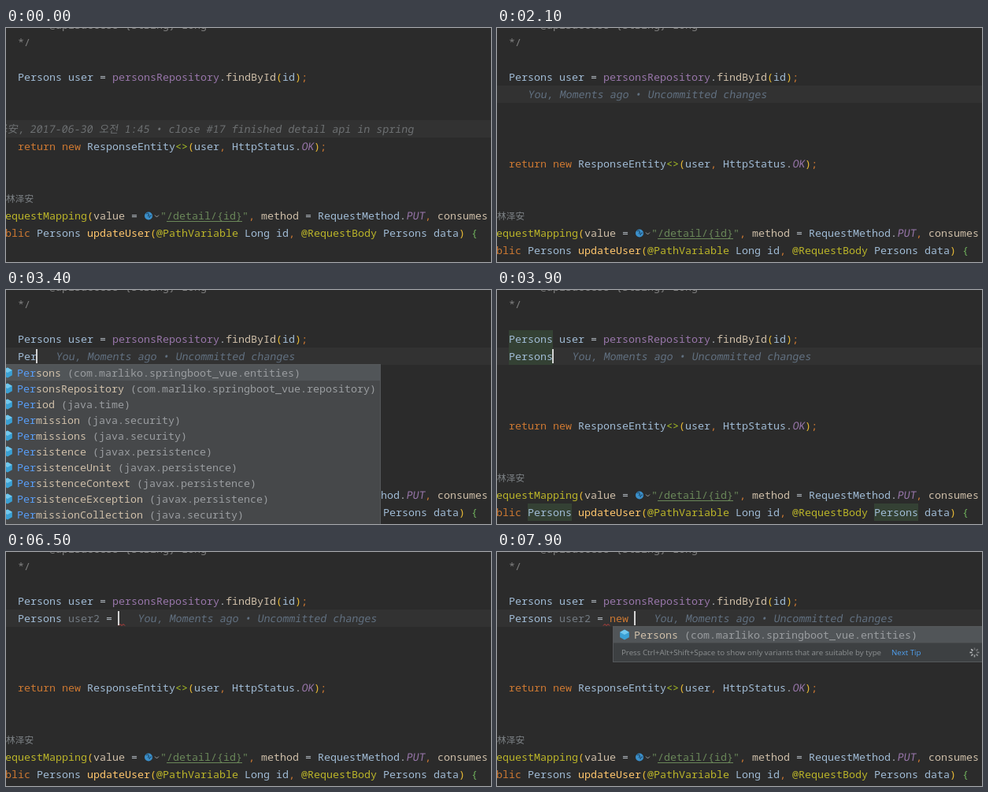
An HTML page for the animation above (8000 ms loop, 616 by 297 pixels).

```html
<!DOCTYPE html>
<html lang="en">
<head>
<meta charset="utf-8">
<title>Typing in a code editor</title>
<style>
  html, body { margin: 0; width: 100%; height: 100%; overflow: hidden; background: #2b2b2b; }
  svg { display: block; }
  text {
    white-space: pre;
    font: 13.333px "Noto Sans Mono", "Noto Sans CJK SC", "Noto Sans CJK KR", "Noto Sans CJK", monospace;
  }
  text.tip { font: 9.75px "Open Sans", "Noto Sans", sans-serif; }
  text.author { font-size: 11.7px; }
</style>
</head>
<body>
<svg id="stage" width="616" height="297" viewBox="0 0 616 297"></svg>
<script>
const LOOP = 8000, CELL = 8, LEFT = 15;
const AUTHOR = '林泽安', PKG = 'com.marliko.springboot_vue';
const ink = {
  t: '#a0bbd5', // types and variables
  p: '#b5bcc4', // punctuation
  k: '#cc7832', // keywords
  f: '#9876aa', // fields
  c: '#cfbfa9', // calls and attributes
  d: '#ffc66d', // declarations
  a: '#bbb529', // annotations
  s: '#6a8759', // strings
  b: '#e8ba36', // round brackets
  n: '#a8c023', // angle brackets
  q: '#6fae5c', // braces
  m: '#808080', // comments
  u: '#727a82', // unused
  g: '#9a9da0', // popup details
  h: '#589df6', // matched letters
  w: '#c8cacc'
};

const stage = document.getElementById('stage');

function add(parent, tag, attrs, text) {
  const el = document.createElementNS('http://www.w3.org/2000/svg', tag);
  for (const key in attrs) el.setAttribute(key, attrs[key]);
  if (text) el.textContent = text;
  parent.appendChild(el);
  return el;
}
const rect = (g, x, y, width, height, fill) => add(g, 'rect', { x, y, width, height, fill });
const path = (g, d, stroke, width = 1, fill = 'none') =>
  add(g, 'path', { d, stroke, 'stroke-width': width, fill });

function slanted(g, x, y, text, fill) {
  add(g, 'text', { transform: `translate(${x} ${y}) skewX(-9)`, fill }, text);
}

// runs: colour key, text, colour key, text ...; returns the end x
function line(g, x, y, runs) {
  for (let i = 0; i < runs.length; i += 2) {
    const [key, text] = [runs[i], runs[i + 1]];
    if (key === 'i') slanted(g, x, y, text, ink.f);
    else add(g, 'text', { x, y, fill: ink[key] }, text);
    x += text.length * CELL;
  }
  return x;
}

function blame(g, x, y) {
  const fill = '#6d7072';
  slanted(g, x, y, AUTHOR + ',', fill);
  slanted(g, x + 55, y, '2017-06-30 오전', fill);
  slanted(g, x + 175, y, '1:45 • close #17 finished detail api in spring', fill);
}

// Layers
const back = add(stage, 'g');
const upper = add(stage, 'g');
const lower = add(stage, 'g');
const front = add(stage, 'g');

line(upper, 55, 1, ['m', '@apiSuccess {String} Long']);
line(upper, LEFT, 23, ['m', '*/']);
line(upper, LEFT, 67, ['t', 'Persons user ', 'p', '= ', 'f', 'personsRepository', 'p', '.',
  'c', 'findById', 'b', '(', 't', 'id', 'b', ')', 'k', ';']);

line(lower, LEFT, 155, ['k', 'return new ', 't', 'ResponseEntity', 'n', '<>', 'b', '(',
  't', 'user', 'k', ', ', 't', 'HttpStatus', 'p', '.', 'i', 'OK', 'b', ')', 'k', ';']);
add(lower, 'text', { x: 0, y: 221, fill: '#7d8286', class: 'author' }, AUTHOR);
line(lower, -17, 243, ['a', '@RequestMapping', 'b', '(', 'c', 'value ', 'p', '=']);
add(lower, 'circle', { cx: 181, cy: 238.5, r: 5, fill: '#3b8fc9' });
path(lower, 'M178 236q2 -2 3 0t-1 3M182 241q0 -3 3 -3', '#1f4d70', 1.2);
path(lower, 'M189 237.5l2.5 2.5l2.5 -2.5', '#9da0a2');
line(lower, 196, 243, ['s', '"/detail/{id}"', 'k', ', ', 'c', 'method ', 'p', '= ',
  't', 'RequestMethod', 'p', '.', 'i', 'PUT', 'k', ', ', 'c', 'consumes']);
rect(lower, 204, 245, 96, 1, ink.s);
line(lower, -17, 265, ['k', 'public ', 't', 'Persons ', 'd', 'updateUser', 'b', '(',
  'a', '@PathVariable ', 't', 'Long id', 'k', ', ', 'a', '@RequestBody ', 't', 'Persons data',
  'b', ')', 'p', ' ', 'q', '{']);

// Popup parts
const hexagon = (x, y, r) =>
  `M${x} ${y - r}l${r * .9} ${r / 2}v${r}l${-r * .9} ${r / 2}l${-r * .9} ${-r / 2}v${-r}z`;

function cube(g, x, y, solid) {
  path(g, hexagon(x, y, 5), '#4a9be8', 1.3, solid ? '#6cb4f2' : 'none');
  path(g, `M${x - 4} ${y - 2}l4 2l4 -2M${x} ${y}v5`, solid ? '#2f6fae' : '#4a9be8');
}

function methodIcon(g, y, solid) {
  path(g, `M122 ${y - 3}h5M123.500 ${y}h3.500M122 ${y + 3}h5`, '#5f96d6', 1.2);
  cube(g, 132.500, y, solid);
}

function classIcon(g, x, y) {
  path(g, hexagon(x, y, 6.5), 'none', 0, '#3aa0d4');
  path(g, `M${x} ${y - 6.5}l5.850 3.250l-5.850 3.250l-5.850 -3.250z`, 'none', 0, '#72c8ee');
}

function panel(g, x, right, bottom, footer) {
  rect(g, x, 94, right - x, bottom - 94, '#55585a');
  rect(g, x + 1, 95, right - x - 2, bottom - 96, '#46484a');
  rect(g, x + 1, 95, right - x - 2, 20, '#515558');
  if (footer) rect(g, x + 1, footer, right - x - 2, bottom - footer - 1, '#3d4042');
}

function tip(g, x, y, text, linkX) {
  add(g, 'text', { x, y, fill: '#8d9092', class: 'tip' }, text);
  add(g, 'text', { x: linkX, y, fill: '#4f9fee', class: 'tip' }, 'Next Tip');
}

const classes = [
  ['sons', PKG + '.entities'], ['sonsRepository', PKG + '.repository'],
  ['iod', 'java.time'], ['mission', 'java.security'], ['missions', 'java.security'],
  ['sistence', 'javax.persistence'], ['sistenceUnit', 'javax.persistence'],
  ['sistenceContext', 'javax.persistence'], ['sistenceException', 'javax.persistence'],
  ['missionCollection', 'java.security']
];

const popups = {
  classes(g) {
    panel(g, -13, 476, 300);
    classes.forEach(([name, pkg], i) => {
      classIcon(g, 2, 105 + i * 20);
      line(g, 14, 110 + i * 20, ['h', 'Per', 'c', name + ' ', 'g', `(${pkg})`]);
    });
  },
  members(g, s) {
    const whole = s.match === 'new';
    panel(g, 115, 618, 200, 177);
    line(g, 142, 110, whole ? ['h', 'new'] : ['h', 'ne', 'w', 'w']);
    [['getO', 130], ['findO', 150]].forEach(([name, y]) => {
      methodIcon(g, y - 5, false);
      line(g, 142, y, ['c', 'personsRepository.' + name, 'h', 'ne', 'g', '(Long id)']);
      line(g, 549, y, ['g', 'Persons']);
    });
    methodIcon(g, 165, true);
    line(g, 142, 170, ['c', 'clo', 'h', 'ne', 'g', '()']);
    line(g, 557, 170, ['g', 'Object']);
    tip(g, 126, 191, 'Press Ctrl+Space to see non-imported classes', 340);
    for (const y of [183, 187, 191]) add(g, 'circle', { cx: 606, cy: y, r: 1.4, fill: '#e3c04b' });
  },
  created(g, s) {
    panel(g, 147, 618, 140, 116);
    classIcon(g, 162, 105);
    line(g, 174, 110, ['c', 'Persons ', 'g', `(${PKG}.entities)`]);
    tip(g, 158, 131, 'Press Ctrl+Alt+Shift+Space to show only variants that are suitable by type', 501);
    if (!s.busy) return;
    for (let i = 0; i < 8; i++) {
      add(g, 'path', {
        d: 'M0 -3v-3', stroke: '#d0d2d4', 'stroke-width': 1.6, opacity: .3 + i * .09,
        transform: `translate(606.500 127.500) rotate(${i * 45})`
      });
    }
  }
};

// Each step changes only the listed parts of the state
const named = ['t', 'Persons ', 'u', 'user2 ', 'p', '= '];
const steps = [
  [0, { row: 117, split: 0, typed: [], caret: 0, squiggle: 0, uses: 0, popup: '', busy: 0, match: '' }],
  [300, { row: 51, caret: 1 }],
  [1200, { row: 73, split: 1 }],
  [2100, { caret: 0 }],
  [2600, { caret: 1 }],
  [3000, { typed: ['t', 'P'] }],
  [3200, { typed: ['t', 'Pe'] }],
  [3300, { typed: ['t', 'Per'] }],
  [3400, { popup: 'classes' }],
  [3900, { typed: ['t', 'Persons'], popup: '', uses: 1 }],
  [4200, { typed: ['t', 'Persons '] }],
  [4300, { uses: 0 }],
  [4700, { typed: ['t', 'Persons us'] }],
  [4800, { typed: ['t', 'Persons user'] }],
  [5000, { typed: ['t', 'Persons users'] }],
  [5300, { typed: ['t', 'Persons ', 'u', 'users'], squiggle: 119 }],
  [5900, { typed: ['t', 'Persons ', 'u', 'user', 't', '2'] }],
  [6100, { typed: ['t', 'Persons ', 'u', 'user', 't', '2 ', 'p', '='] }],
  [6200, { typed: ['t', 'Persons ', 'u', 'user', 't', '2 ', 'p', '= '] }],
  [6500, { typed: named, squiggle: 143 }],
  [7100, { caret: 0 }],
  [7400, { typed: [...named, 't', 'n'], caret: 1, squiggle: 135 }],
  [7500, { typed: [...named, 't', 'ne'], popup: 'members' }],
  [7600, { typed: [...named, 't', 'new'], match: 'new' }],
  [7700, { typed: [...named, 'k', 'new '], popup: '' }],
  [7800, { popup: 'created' }],
  [7900, { busy: 1 }]
];
let state = {};
const states = steps.map(([, change]) => (state = { ...state, ...change }));

function draw(s) {
  back.replaceChildren();
  front.replaceChildren();
  lower.setAttribute('transform', `translate(0 ${s.split * 22})`);
  rect(back, 0, s.row, 616, 22, '#323232');
  if (s.uses) {
    for (const [x, y] of [[15, 51], [15, 73], [39, 271], [479, 271]]) rect(back, x, y, 56, 22, '#344134');
  }
  if (!s.split) {
    if (s.row === 51) {
      blame(front, 407, 67);
      rect(front, 382, 53, 2, 18, '#d4d4d4');
    } else {
      blame(front, -25, 133);
    }
    return;
  }
  const end = line(front, LEFT, 89, s.typed);
  slanted(front, end + 24, 89, 'You, Moments ago • Uncommitted changes', '#617080');
  if (s.squiggle) path(front, `M${s.squiggle} 93.500l2 -2l2 2l2 -2l2 2`, '#c7413d');
  if (s.caret) rect(front, end - 1, 75, 2, 18, '#d4d4d4');
  if (s.popup) popups[s.popup](front, s);
}

const start = performance.now();
let shown = -1;
function tick() {
  const t = (performance.now() - start) % LOOP;
  const index = steps.findLastIndex(([at]) => at <= t);
  if (index !== shown) draw(states[shown = index]);
  requestAnimationFrame(tick);
}
tick();
</script>
</body>
</html>
```
